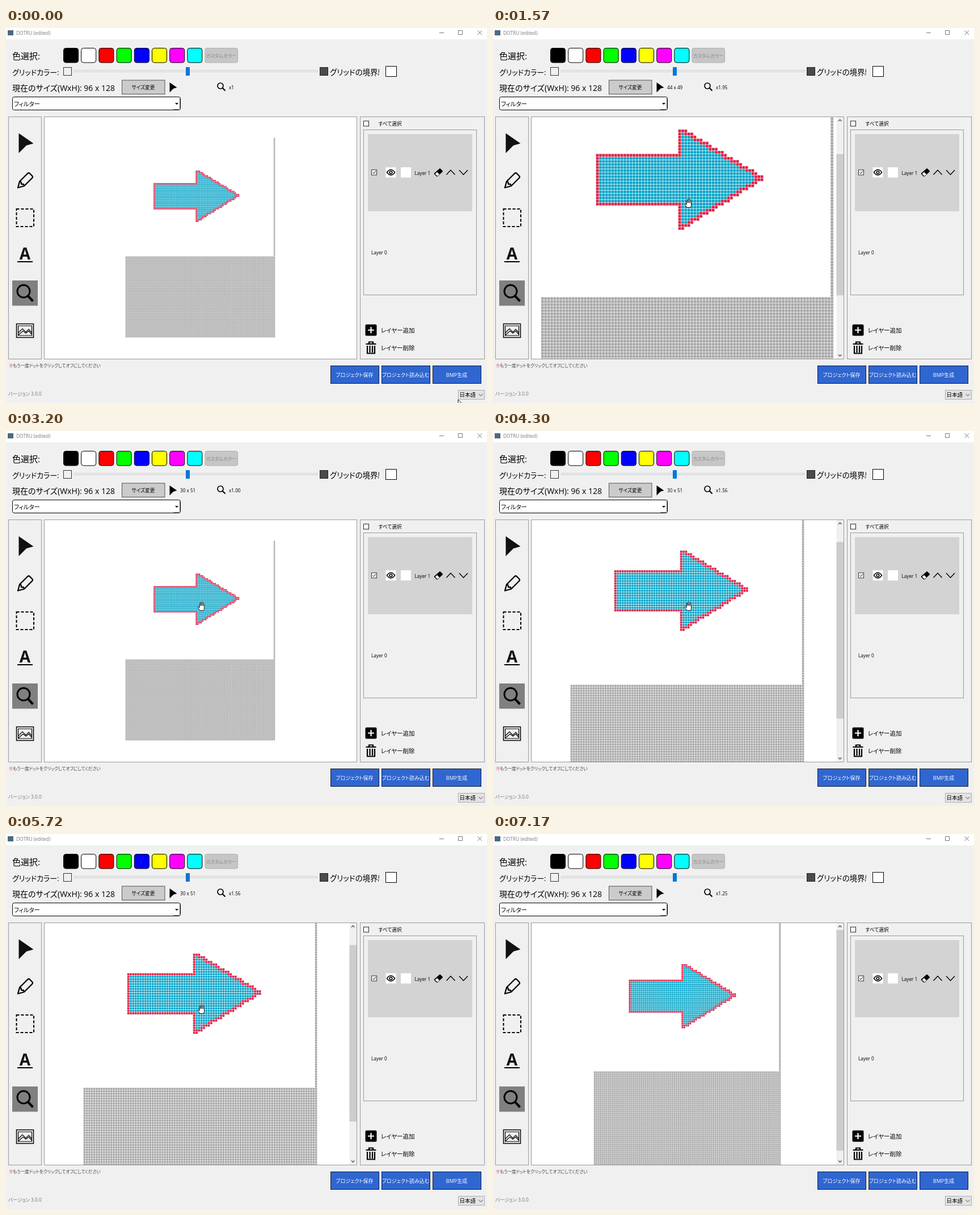
Recreate the animation shown at these times as an HTML page with a canvas. Size 848 by 661 pixels, loop 7570 ms.

```html
<!DOCTYPE html>
<html lang="ja">
<head>
<meta charset="utf-8">
<title>Dot editor</title>
<style>
html, body { margin: 0; width: 848px; height: 661px; overflow: hidden; background: #f0f0f0; }
svg, canvas { position: absolute; left: 0; top: 0; }
text { font-family: "Open Sans", "Noto Sans CJK JP", "Noto Sans CJK", sans-serif; font-feature-settings: "palt"; white-space: pre; }
.line { fill: none; stroke: #000; }
.mid { text-anchor: middle; }
</style>
</head>
<body>
<svg id="ui" width="848" height="661">
  <defs>
    <path id="pointer" d="M0 0 26 18 13.5 21.5 0 35Z"/>
    <clipPath id="cut"><rect x="571" y="66" width="87" height="22"/></clipPath>
  </defs>
  <rect width="848" height="20" fill="#fff"/>
  <rect x="3" y="4" width="10" height="9" fill="#4a6a80"/>
  <path class="line" style="stroke:#777" d="M764 8.5h8M797.5 4.5h7v7h-7zM831.500 4.500l7.500 7.500m0-7.500l-7.500 7.500"/>

  <g id="swatches" stroke="#000"></g>
  <rect x="351" y="35.500" width="57.500" height="25.500" rx="3" fill="#c6c6c6" stroke="#b0b0b0"/>

  <rect x="101.500" y="69.500" width="14" height="14" fill="#f0f0f0" stroke="#333"/>
  <rect x="120.500" y="74.500" width="429" height="3" fill="#e7eaea" stroke="#d6d6d6"/>
  <rect x="317" y="69" width="7" height="15" fill="#0078d7"/>
  <rect x="553.500" y="69.500" width="14" height="14" fill="#4a4a4a" stroke="#222"/>
  <rect x="669.500" y="67.500" width="19" height="18" fill="#fff" stroke="#000"/>

  <rect x="204.500" y="92" width="75.500" height="24.500" fill="#cbcbcb" stroke="#555"/>
  <use href="#pointer" transform="translate(288.500 96) scale(.5)"/>
  <circle class="line" cx="378" cy="102" r="5" stroke-width="1.700"/>
  <path class="line" stroke-width="2.200" d="M381.500 105.500l5 5"/>

  <rect x="11.500" y="121.500" width="296" height="23" rx="3" fill="#fff" stroke="#000"/>
  <path class="line" style="stroke:#777" d="M306.500 123v20.500h-11"/>
  <path d="M298 132h6l-3 3.200z"/>

  <g fill="none" stroke="#9a9a9a">
    <rect x="4.500" y="156.500" width="58" height="427"/>
    <rect x="67.500" y="156.500" width="551" height="427"/>
    <rect x="624.500" y="156.500" width="219" height="427"/>
    <rect x="630.500" y="179.500" width="199" height="291"/>
  </g>

  <use href="#pointer" x="22.500" y="185.500" fill="#111"/>
  <path class="line" stroke-width="2.300" stroke-linejoin="round" d="M21 281.500l3-11 14-14q2-2 4 0l4 4q2 2 0 4l-14 14zM24 270.500l2.500 1 .5 3.500 4 .5 1 3"/>
  <rect class="line" x="18.500" y="319" width="30.500" height="31" stroke-width="2" stroke-dasharray="5 3"/>
  <path class="line" stroke-width="2" d="M20 412h27"/>
  <rect x="11" y="445" width="45" height="44.500" fill="#808080"/>
  <circle class="line" cx="31" cy="464" r="11" stroke-width="3"/>
  <path class="line" stroke-width="4" d="M38.500 472l9 9.500"/>
  <path class="line" stroke-width="1.500" d="M18.500 521.500h30v24h-30z"/>
  <path class="line" d="M21.500 525h24v17h-24zM22 537l7-7 6 6 5-5 5.500 6M22 541l8-7 5 4 5-4 5.500 6" stroke-width="1.200"/>

  <rect x="630.500" y="164" width="9" height="9" fill="#fff" stroke="#222"/>
  <rect x="638" y="187" width="184" height="136" fill="#d3d3d3"/>
  <rect x="644.500" y="250" width="9" height="9" fill="#fff" stroke="#333"/>
  <path class="line" d="M646.500 254.500l2 2 3.500-4.500"/>
  <path fill="#fff" d="M669.500 245.500h18v18h-18zM696 245.500h18v18h-18z"/>
  <path class="line" stroke-width="1.500" d="M671.500 254.500q7-9.500 14 0q-7 9.500-14 0z"/>
  <circle class="line" cx="678.500" cy="254.500" r="2.300" stroke-width="1.600"/>
  <path d="M755 256l9-8q1-1 2 0l3.500 3.500q1 1 0 2l-8.500 8q-1 .7-2 0l-4-4q-.7-.7 0-1.500z"/>
  <path d="M756.500 257l3.500-3 4 4-3.500 3z" fill="#fff"/>
  <path class="line" stroke-width="1.400" d="M776.500 258.500l7.500-8 7.500 8M799 250.500l7.500 8 7.500-8"/>
  <rect x="633.500" y="522.500" width="20" height="20" rx="2"/>
  <path class="line" style="stroke:#fff" stroke-width="2.200" d="M638 532.500h11m-5.500-5.500v11"/>
  <path class="line" stroke-width="2.200" d="M634.500 557h18M640 556v-2.500h7v2.500M637 560v13.500h13v-13.500M641.500 560v12m4.500-12v12"/>

  <g fill="#2f66d0" stroke="#101c38">
    <rect x="572.500" y="595.500" width="85" height="31"/>
    <rect x="662.500" y="595.500" width="85" height="31"/>
    <rect x="752.500" y="595.500" width="85" height="31"/>
  </g>
  <rect x="797.500" y="638.500" width="46" height="16" fill="#e3e3e3" stroke="#adadad"/>
  <path class="line" style="stroke:#444" d="M833.500 645l3.500 3.500 3.500-3.500"/>
</svg>
<canvas id="stage" width="848" height="661"></canvas>
<svg id="cursor" width="848" height="661">
  <path id="arrow" fill="#fff" stroke="#000" stroke-width=".9" d="M0 0v11.500l2.700-2.500 1.900 4 1.700-.8-1.900-3.900h3.600z"/>
  <path id="hand" fill="#fff" stroke="#000" stroke-width=".9" stroke-linejoin="round"
    d="M-3 13.500l-3.500-5q-.8-1.700.8-1.700l2 1.700v-7.500q1-1.600 2 0v4v-6q1-1.600 2.100 0v6v-5.500q1-1.500 2.100 0v6v-4q1-1.400 2 0v7.500q0 3-1.500 4.500z"/>
</svg>
<script>
const LOOP = 7570, STEP = 69, CELL = 2.75, COLS = 96, ROWS = 128;
const AREA = { x: 68, y: 157, w: 550, h: 426 }, BAR = 12.5;
const $ = id => document.getElementById(id);
const ctx = $('stage').getContext('2d');
const clamp = (v, a, b) => Math.min(b, Math.max(a, v));

function add(parent, tag, attrs, content = '') {
  const el = document.createElementNS('http://www.w3.org/2000/svg', tag);
  for (const k in attrs) el.setAttribute(k, attrs[k]);
  el.textContent = content;
  return parent.appendChild(el);
}
const text = (x, y, size, str, fill = '#000', more = {}) =>
  add($('ui'), 'text', { x, y, 'font-size': size, fill, ...more }, str);

['#000', '#fff', '#f00', '#0f0', '#00f', '#ff0', '#f0f', '#0ff'].forEach((fill, i) =>
  add($('swatches'), 'rect', { x: 101.5 + i * 31.2, y: 35.5, width: 26, height: 25.5, rx: 4, fill }));

const mid = { class: 'mid' };
text(18, 12, 8.4, 'DOTRU (edited)', '#777');
text(11, 55, 15, '色選択:');
text(379.500, 52, 8.4, 'カスタムカラー', '#888', mid);
text(11, 82.500, 13, 'グリッドカラー:');
text(571, 82.500, 13.5, 'グリッドの境界線', '#000', { 'clip-path': 'url(#cut)' });
text(11, 111, 14, '現在のサイズ');
text(91, 110.500, 14, '(WxH): 96 x 128');
text(242, 108, 8.7, 'サイズ変更', '#000', mid);
text(14, 137.500, 10.5, 'フィルター');
text(33.500, 408, 28, 'A', '#111', { class: 'mid', 'font-weight': 700 });
text(656.500, 172, 8.7, 'すべて選択');
text(720.500, 258.500, 8.2, 'Layer 1');
text(644, 399, 8.2, 'Layer 0');
text(661, 537, 10.5, 'レイヤー追加');
text(661, 568, 10.5, 'レイヤー削除');
text(5, 597.500, 7.7, '※', '#c22');
text(12, 597.500, 7.7, 'もう一度ドットをクリックしてオフにしてください', '#444');
text(4, 648, 8.4, 'バージョン 3.0.0', '#777');
text(614.500, 614.500, 9, 'プロジェクト保存', '#fff', mid);
text(704.500, 614.500, 9, 'プロジェクト読み込む', '#fff', mid);
text(794.500, 614.500, 9, 'BMP生成', '#fff', mid);
text(799.500, 650, 9.5, '日本語');
const cellLabel = text(307, 107.500, 8.2, '');
const zoomLabel = text(393, 107.500, 8.2, '');

// Mouse path: enter, one nudge, leave.
const START = [797, 655], FIRST = [332, 312], REST = [345, 303], END = [802, 663];
function mouseAt(t) {
  const glide = (a, b, from, n) => {
    const k = clamp(Math.floor((t - from) / STEP) + 1, 0, n) / n;
    const s = k * k * (3 - 2 * k);
    return a.map((v, i) => v + (b[i] - v) * s);
  };
  if (t < 1000) return glide(START, FIRST, 70, 9);
  if (t < 6000) return glide(FIRST, REST, 1430, 2);
  return glide(REST, END, 6540, 10);
}

// Wheel bursts: start time, then zoom exponents of 1.25 one step apart.
const bursts = [
  [820, 1], [950, 2, 3, 4, 5, 6], [1430, 5, 4, 3, 2, 1, 0, 1, 2], [2190, 3, 4],
  [2660, 3, 2, 1, 0, -2], [3130, -1, 0, 1, 2], [3470, 3], [3880, 2, 1, 0], [4230, 1, 2],
  [4500, 1, 0, -1, -2, -3, -4, -5, -4, -3, -1, 0], [5260, 1],
  [5720, 2, 3, 4, 5, 6], [6190, 5, 4, 3, 2, 1]
];

// Zoom about the mouse, centred while the sheet fits.
function makeView(t, e, prev) {
  const zoom = 1.25 ** e, p = CELL * zoom, w = COLS * p, h = ROWS * p;
  const vw = h > AREA.h ? AREA.w - BAR : AREA.w;
  const vh = w > vw ? AREA.h - BAR : AREA.h;
  const place = (m, old, size, view, from, centre) => size <= view
    ? centre - size / 2
    : clamp(m - (m - old) * p / prev.p, from + view - size, from);
  const [mx, my] = mouseAt(t);
  return {
    t, zoom, p, w, h, vw, vh,
    x: place(mx, prev && prev.x, w, vw, AREA.x, 342.5),
    y: place(my, prev && prev.y, h, vh, AREA.y, 369.5)
  };
}
const views = [makeView(0, 0)];
for (const [t, ...exps] of bursts)
  exps.forEach((e, i) => views.push(makeView(t + i * STEP, e, views[views.length - 1])));

// Dot arrow: first and last column of each row.
const TOP = 21, BOTTOM = 53;
function span(r) {
  if (r < TOP || r > BOTTOM) return [0, 0];
  const end = r < 37 ? 48 + Math.round((r - TOP) * 5 / 3) : 73 - Math.round((r - 37) * 1.625);
  return [r >= 29 && r <= 45 ? 18 : 45, end];
}
const inside = (c, r) => { const [a, b] = span(r); return c >= a && c < b; };
const edgeCells = [];
for (let r = TOP; r <= BOTTOM; r++) {
  const [a, b] = span(r);
  for (let c = a; c < b; c++) {
    const around = [-1, 0, 1].every(i => [-1, 0, 1].every(j => inside(c + i, r + j)));
    if (!around) edgeCells.push([c, r]);
  }
}

function drawSheet({ x, y, p, w, h }) {
  const block = (c, r, cw, ch) => ctx.fillRect(x + c * p, y + r * p, cw * p, ch * p);
  ctx.fillStyle = '#a6a6a6';
  block(95, 0, 1, 76);
  block(0, 76, COLS, 52);
  ctx.fillStyle = '#00a2c6';
  for (let r = TOP; r <= BOTTOM; r++) {
    const [a, b] = span(r);
    block(a, r, b - a, 1);
  }
  ctx.fillStyle = '#e31c40';
  for (const [c, r] of edgeCells) block(c, r, 1, 1);
  ctx.strokeStyle = 'rgba(255,255,255,.78)';
  ctx.lineWidth = Math.min(0.9, p * 0.2);
  ctx.beginPath();
  for (let c = 0; c <= COLS; c++) { ctx.moveTo(x + c * p, y); ctx.lineTo(x + c * p, y + h); }
  for (let r = 0; r <= ROWS; r++) { ctx.moveTo(x, y + r * p); ctx.lineTo(x + w, y + r * p); }
  ctx.stroke();
}

function drawBar(x, y, length, offset, view, size, vertical) {
  const track = length - 24;
  ctx.save();
  ctx.translate(x, y);
  if (vertical) ctx.transform(0, 1, 1, 0, 0, 0);
  ctx.fillStyle = '#f0f0f0';
  ctx.fillRect(0, 0, length, BAR);
  ctx.fillStyle = '#cdcdcd';
  ctx.fillRect(12 + offset / size * track, 0, view / size * track, BAR);
  ctx.strokeStyle = '#505050';
  ctx.lineWidth = 1.2;
  ctx.beginPath();
  for (const [tip, d] of [[4.5, 3], [length - 4.5, -3]]) {
    ctx.moveTo(tip + d, 3.5); ctx.lineTo(tip, 6.2); ctx.lineTo(tip + d, 9);
  }
  ctx.stroke();
  ctx.restore();
}

function cellText(t, view, [mx, my], hovering) {
  if (t >= 2940 && t < 6540) return '30 x 51';
  if (t >= 1499 && t < 6540) return '44 x 49';
  if (t >= 820 && t < 6540) return '46 x 45';
  const col = Math.ceil((mx - view.x) / view.p), row = Math.ceil((my - view.y) / view.p);
  const onSheet = col > 0 && col <= COLS && row > 0 && row <= ROWS;
  return hovering && onSheet ? `${row} x ${col}` : '';
}

function draw(t) {
  let view = views[0];
  for (const v of views) if (v.t <= t) view = v;
  const { x, y, w, h, vw, vh } = view;

  ctx.fillStyle = '#fff';
  ctx.fillRect(AREA.x, AREA.y, AREA.w, AREA.h);
  ctx.save();
  ctx.beginPath();
  ctx.rect(AREA.x, AREA.y, vw, vh);
  ctx.clip();
  drawSheet(view);
  ctx.restore();
  if (w > vw && h > vh) {
    ctx.fillStyle = '#f0f0f0';
    ctx.fillRect(AREA.x + vw, AREA.y + vh, BAR, BAR);
  }
  if (h > vh) drawBar(AREA.x + vw, AREA.y, vh, AREA.y - y, vh, h, true);
  if (w > vw) drawBar(AREA.x, AREA.y + vh, vw, AREA.x - x, vw, w, false);

  const mouse = mouseAt(t), [mx, my] = mouse;
  const hovering = mx > AREA.x && mx < AREA.x + AREA.w && my > AREA.y && my < AREA.y + AREA.h;
  cellLabel.textContent = cellText(t, view, mouse, hovering);
  zoomLabel.textContent = t < 820 ? 'x1' : 'x' + view.zoom.toFixed(2);
  for (const [id, on] of [['hand', hovering], ['arrow', !hovering]]) {
    $(id).setAttribute('transform', `translate(${mx} ${my})`);
    $(id).setAttribute('visibility', on ? 'visible' : 'hidden');
  }
}

const start = performance.now();
function tick() {
  draw((performance.now() - start) % LOOP);
  requestAnimationFrame(tick);
}
tick();
</script>
</body>
</html>
```
